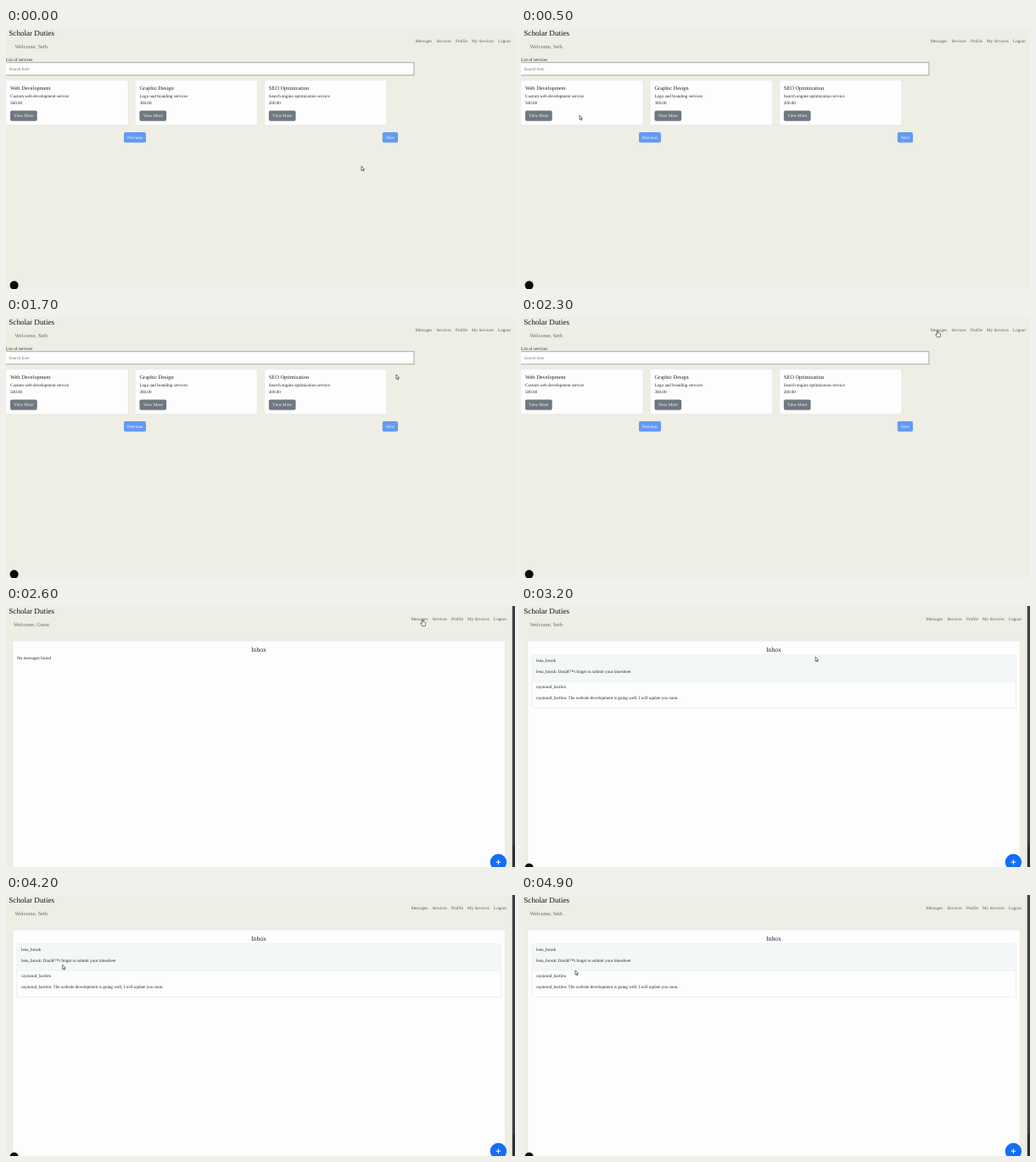
Animation of 600x308 px, one loop 5000 ms. Source, as an HTML page:

```html
<!DOCTYPE html>
<html lang="en">
<head>
<meta charset="utf-8">
<title>Service board</title>
<style>
  html, body { margin: 0; width: 100%; height: 100%; overflow: hidden; background: #eeeee5; }
  svg { display: block; width: 600px; height: 308px; }
  text {
    font-family: "Liberation Serif", "Times New Roman", serif;
    font-size: 5.13px;
    fill: #212529;
    text-rendering: geometricPrecision;
  }
  .brand { font-size: 9.1px; fill: #111; }
  .hello { font-size: 6.4px; fill: #6a6a66; }
  .nav { fill: #5c5c59; }
  .head { font-size: 6.4px; }
  .inbox { font-size: 7.7px; text-anchor: middle; }
  .hint { fill: #757575; }
  .label { fill: #fff; text-anchor: middle; }
  .panel { fill: #fdfdfe; stroke: #d9d9d1; stroke-width: .4; }
</style>
</head>
<body>
<svg id="stage" viewBox="0 0 600 308">
  <rect width="600" height="308" fill="#eeeee5"/>
  <g id="services"></g>
  <g id="messages"></g>
  <text class="brand" x="3.3" y="9">Scholar Duties</text>
  <text class="hello" id="hello" y="24"></text>
  <g id="menu"></g>
  <circle id="badge" cx="9.6" r="5" fill="#0b0b0b"/>
  <g id="cursor" stroke="#222" stroke-width=".6" stroke-linejoin="round" fill="#fff">
    <path id="arrow" d="M0 0V5.2L1.2 4.1 2 6 2.8 5.6 2 3.8H3.6Z"/>
    <path id="hand" d="M-.7-3.4Q0-4.3.6-3.4V-.8L3.1-.2Q3.8 0 3.7.8L3.1 4.2H-.5L-2.4 1.2Q-2.4.2-.7 1.3Z"/>
  </g>
</svg>
<script>
const NS = "http://www.w3.org/2000/svg";
const $ = id => document.getElementById(id);

function add(parent, tag, attrs, content = "") {
  const el = document.createElementNS(NS, tag);
  for (const key in attrs) el.setAttribute(key, attrs[key]);
  el.textContent = content;
  parent.append(el);
  return el;
}
const box = (parent, x, y, width, height, attrs) =>
  add(parent, "rect", { x, y, width, height, ...attrs });
const write = (parent, x, y, content, cls = "") =>
  add(parent, "text", { x, y, class: cls }, content);

function button(parent, x, y, width, fill, label) {
  box(parent, x, y, width, 12.3, { rx: 1.9, fill });
  write(parent, x + width / 2, y + 7.9, label, "label");
}

// Services page
const services = $("services");
write(services, 0, 38.8, "List of services");
box(services, -.4, 40.8, 481.3, 15, { fill: "#fdfdfe", stroke: "#96968f", "stroke-width": .8 });
write(services, 3.6, 50, "Search here", "hint");
[
  ["Web Development", "Custom web development service", "500.00"],
  ["Graphic Design", "Logo and branding services", "300.00"],
  ["SEO Optimization", "Search engine optimization service", "200.00"]
].forEach(([title, about, price], i) => {
  const x = i * 152.4;
  box(services, x - .3, 61.6, 144.3, 53.2, { rx: 1.9, class: "panel" });
  write(services, x + 5, 73, title, "head");
  write(services, x + 5, 82.4, about);
  write(services, x + 5, 90.4, price);
  button(services, x + 5, 97.4, 31.7, "#6f7780", "View More");
});
button(services, 139, 122.9, 26, "#649af3", "Previous");
button(services, 443.8, 122.9, 18.2, "#649af3", "Next");

// Messages page
const messages = $("messages");
box(messages, 7.9, 41, 580.6, 280, { rx: 1.9, class: "panel" });
write(messages, 298, 53.6, "Inbox", "inbox");
const empty = write(messages, 12.9, 63.4, "No messages found");
const list = add(messages, "g", {});
box(list, 12.9, 57.6, 570.5, 62.9, { rx: 1.9, class: "panel" });
box(list, 13.1, 57.8, 570.1, 31.2, { rx: 1.7, fill: "#f4f7f7" });
box(list, 13, 88.8, 570.3, .4, { fill: "#dadddd" });
[
  ["lena_brook", "Donâ€™t forget to submit your timesheet", 66],
  ["raymond_hartlen", "The website development is going well, I will update you soon.", 97.4]
].forEach(([name, line, y]) => {
  write(list, 18, y, name);
  write(list, 18, y + 12.8, `${name}: ${line}`);
});
add(messages, "circle", { cx: 580.4, cy: 302.3, r: 9.7, fill: "#146ef5" });
add(messages, "path", { d: "M577.6 302.3h5.6M580.4 299.5v5.6", stroke: "#fff", "stroke-width": 1.1 });
box(messages, 596.8, 0, 3.2, 308, { fill: "#2b2d37" });
box(messages, 597.5, 0, 1.8, 282, { fill: "#454752" });

[["Messages", 482.4], ["Services", 507.4], ["Profile", 530], ["My Services", 549], ["Logout", 580]]
  .forEach(([label, x]) => write($("menu"), x, 16.6, label, "nav"));

// Pointer stops: time, x, y
const LOOP = 5000, TICK = 100;
const OPEN = 2600, LOADED = 2900;
const stops = [
  [0, 419, 163], [100, 392, 159], [200, 300, 146], [300, 195, 126], [400, 112, 110],
  [500, 69, 103], [600, 48, 116], [700, 62, 148], [800, 98, 166], [900, 134, 142],
  [1000, 143, 98], [1100, 139, 66], [1200, 165, 72], [1400, 290, 145], [1500, 350, 157],
  [1600, 415, 118], [1700, 460, 68], [1800, 486, 28], [2000, 491, 19.5],
  [2900, 488, 24], [3300, 300, 72], [3400, 300, 72], [3500, 205, 84], [3700, 101, 90.5],
  [4000, 78, 85], [4300, 61, 81], [4800, 61, 81], [4900, 64, 89], [LOOP, 64, 89]
];

function pointerAt(t) {
  const i = stops.findIndex(stop => stop[0] > t);
  const [t0, x0, y0] = stops[i - 1], [t1, x1, y1] = stops[i];
  const k = (t - t0) / (t1 - t0);
  return [x0 + (x1 - x0) * k, y0 + (y1 - y0) * k];
}

const show = (el, on) => el.setAttribute("display", on ? "inline" : "none");

function draw(time) {
  const t = Math.floor((time % LOOP) / TICK) * TICK;
  const opened = t >= OPEN, loaded = t >= LOADED;
  const waiting = opened && !loaded;
  const linked = t >= 1900 && t < LOADED;

  show(services, !opened);
  show(messages, opened);
  show(empty, waiting);
  show(list, loaded);
  show($("badge"), !waiting);
  $("badge").setAttribute("cy", opened ? 308.7 : 303.6);
  $("hello").textContent = waiting ? "Welcome, Guest" : "Welcome, Seth";
  $("hello").setAttribute("x", waiting ? 9 : 10.5);
  $("menu").setAttribute("transform", `translate(${opened ? -5 : 0} 0)`);

  const [x, y] = linked && t >= 2000 ? [491, 19.5] : pointerAt(t);
  show($("arrow"), !linked);
  show($("hand"), linked);
  $("cursor").setAttribute("transform", `translate(${x} ${y})`);
}

const start = performance.now();
function loop() {
  draw(performance.now() - start);
  requestAnimationFrame(loop);
}
loop();
</script>
</body>
</html>
```
